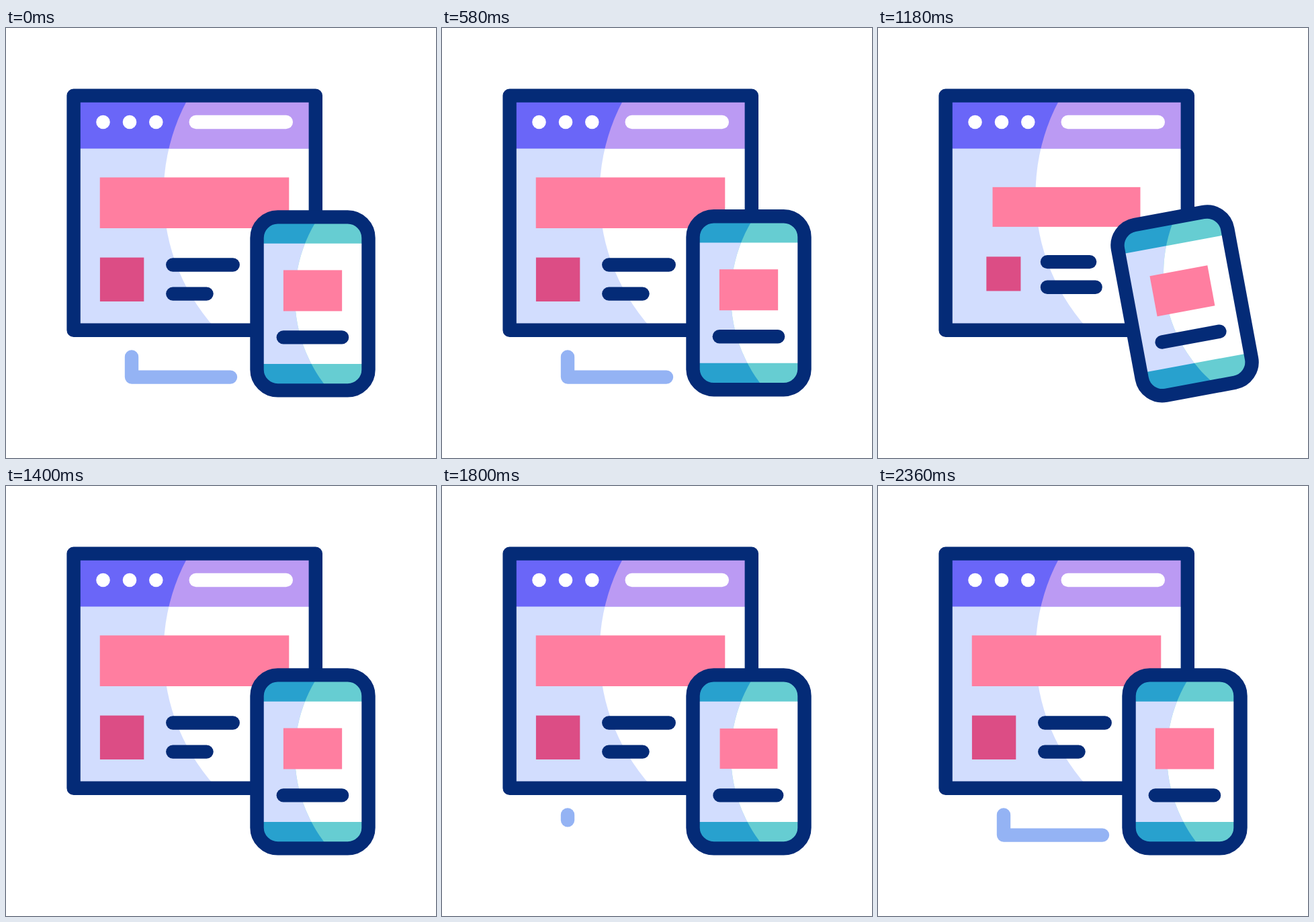
Recreate the animation shown at these times as an HTML page. Size 640 by 640 pixels, loop 2.4 s.

```html
<!DOCTYPE html>
<html lang="en">
<head>
<meta charset="utf-8">
<title>Responsive layout</title>
<style>
  html, body { margin: 0; width: 100%; height: 100%; overflow: hidden; background: #fff; }
  svg { display: block; width: 100vw; height: 100vh; }
  .ink { fill: none; stroke: #042b77; stroke-width: 20.4; stroke-linecap: round; stroke-linejoin: round; }
</style>
</head>
<body>
<svg viewBox="0 0 640 640">
  <defs>
    <clipPath id="winLight"><circle cx="531.5" cy="247.5" r="297"/></clipPath>
    <clipPath id="phoneLight"><circle cx="646" cy="400" r="216"/></clipPath>
    <clipPath id="phoneShape"><rect x="374" y="281" width="165.5" height="258.5" rx="31"/></clipPath>
  </defs>

  <path id="bracket" class="ink" style="stroke:#94b3f4" d="M187 489.5V519.6H334"/>

  <g id="window">
    <path fill="#d2ddfe" d="M101 101H461V450H101z"/>
    <path fill="#6a66f8" d="M101 101H461V179.5H101z"/>
    <g clip-path="url(#winLight)">
      <path fill="#fff" d="M101 179.5H461V450H101z"/>
      <path fill="#bb9af3" d="M101 101H461V179.5H101z"/>
    </g>
    <g fill="#fff">
      <circle cx="144.5" cy="140" r="10.3"/>
      <circle cx="184" cy="140" r="10.3"/>
      <circle cx="223.3" cy="140" r="10.3"/>
    </g>
    <path class="ink" style="stroke:#fff" d="M282.7 140H416.8"/>
    <rect id="banner" fill="#ff7ea0"/>
    <rect id="tile" fill="#dc4d85"/>
    <path id="line1" class="ink"/>
    <path id="line2" class="ink"/>
    <path class="ink" d="M100.6 100.6H460.8V449.8H100.6z"/>
  </g>

  <g id="phone">
    <g clip-path="url(#phoneShape)">
      <path fill="#28a1ce" d="M370 280H545V545H370z"/>
      <path fill="#d2ddfe" d="M370 320.7H545V500H370z"/>
      <g clip-path="url(#phoneLight)">
        <path fill="#66cdd2" d="M370 280H545V545H370z"/>
        <path fill="#fff" d="M370 320.7H545V500H370z"/>
      </g>
    </g>
    <rect id="card" fill="#ff7ea0"/>
    <path id="line3" class="ink"/>
    <rect class="ink" x="373.5" y="281.4" width="166" height="258" rx="31"/>
  </g>
</svg>
<script>
const LOOP = 2400, LIFT = 46.7, SHRINK = 0.383, TRAIL = 177.1;
const el = id => document.getElementById(id);

// Eased value at time t through [time, value] keys
function track(t, keys) {
  let [t0, v0] = keys[0];
  if (t <= t0) return v0;
  for (const [t1, v1] of keys) {
    if (t < t1) {
      const s = (t - t0) / (t1 - t0);
      return v0 + (v1 - v0) * s * s * (3 - 2 * s);
    }
    [t0, v0] = [t1, v1];
  }
  return v0;
}

const pulse = (t, start, half) => track(t, [[start, 0], [start + half, 1], [start + 2 * half, 0]]);

function box(id, cx, cy, w, h, scale) {
  w *= scale;
  h *= scale;
  const attrs = { x: cx - w / 2, y: cy - h / 2, width: w, height: h };
  for (const name in attrs) el(id).setAttribute(name, attrs[name]);
}

const line = (id, x1, x2, y) => el(id).setAttribute('d', `M${x1} ${y}H${x2}`);

function draw(t) {
  const p = pulse(t, 600, 400);
  box('banner', 280.5 , 260.2 + 10.8 * p, 281.5, 75.6, 1 - SHRINK * p);
  box('tile', 172.6 + 25 * p, 374.3 - 14.7 * p, 65.4, 65.4, 1 - SHRINK * p);
  line('line1', 248.3 + 6.4 * p, 337.7 - 39.5 * p, 352.5 - 7.7 * p);
  line('line2', 248.3 + 6.4 * p, 298.5 + 44 * p, 395.6 - 17.2 * p);
  el('window').setAttribute('transform', `translate(0 ${-LIFT * pulse(t, 1400, 200)})`);

  const q = pulse(t, 1763, 300);
  box('card', 456.5, 390.9, 87.3, 61, 1 - SHRINK * q);
  line('line3', 412.8 + 16 * q, 500 - 42 * q, 460.4);

  const tilt = track(t, [[600, 0], [800, -11.1], [1000, 12.3], [1200, -11.1], [1400, 0]]);
  const rise = -LIFT * pulse(t, 200, 200);
  el('phone').setAttribute('transform', `translate(0 ${rise}) rotate(${tilt} 456.5 410.4)`);

  const shown = TRAIL * track(t, [[600, 1], [1000, 0], [1763, 0], [2063, 1]]);
  el('bracket').style.strokeDasharray = `${shown} 400`;
  el('bracket').style.visibility = shown > 0.01 ? 'visible' : 'hidden';
}

const begin = performance.now();
function tick() {
  draw((performance.now() - begin) % LOOP);
  requestAnimationFrame(tick);
}
tick();
</script>
</body>
</html>
```
